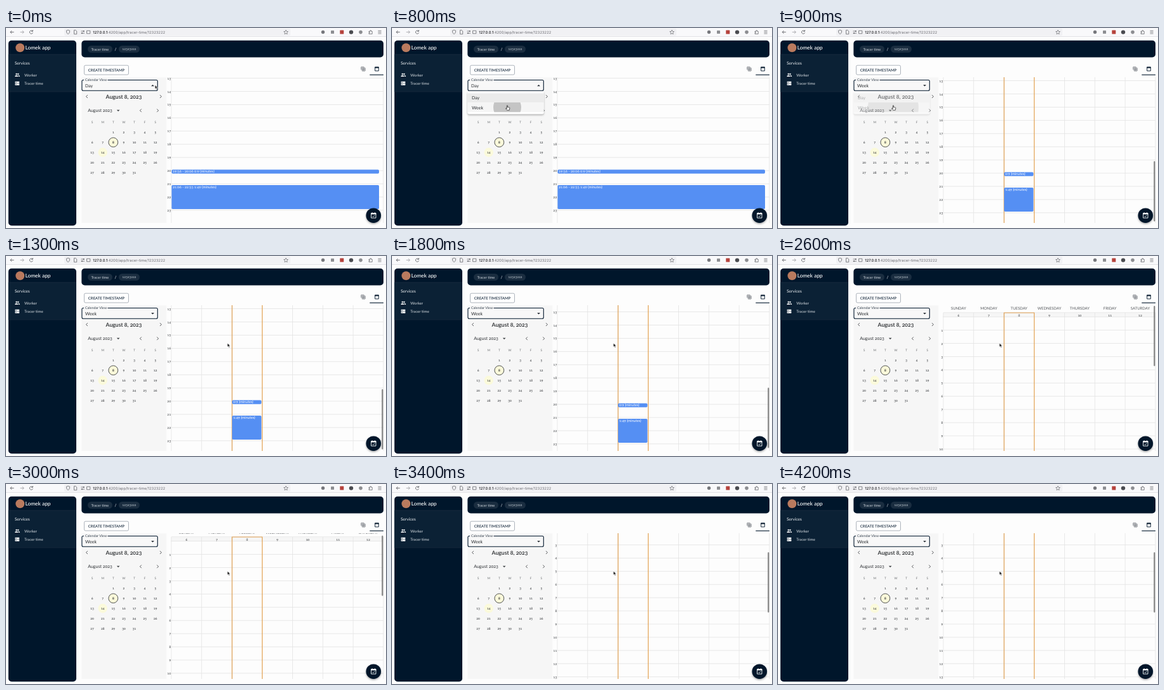
Recreate the animation shown at these times as an HTML page. Size 600x317 px, loop 4.3 s.

```html
<!DOCTYPE html>
<html lang="en">
<head>
<meta charset="utf-8">
<title>Calendar view</title>
<style>
  html, body { margin: 0; width: 100%; height: 100%; overflow: hidden; background: #fdfdfd; }
  svg { display: block; width: 100%; height: 100%; }
  text {
    font-family: Lato, "Open Sans", sans-serif;
    font-variant-numeric: oldstyle-nums;
    text-rendering: geometricPrecision;
    white-space: pre;
  }
</style>
</head>
<body>
<svg id="stage" viewBox="0 0 600 317">
  <defs>
    <clipPath id="pane"><rect x="252" y="78.5" width="345" height="230.5"/></clipPath>
    <clipPath id="weekItem"><rect x="119.5" y="118" width="120" height="15.2"/></clipPath>
    <filter id="shadow" x="-30%" y="-30%" width="160%" height="180%">
      <feDropShadow dx="0" dy="1.5" stdDeviation="1.6" flood-opacity=".35"/>
    </filter>
  </defs>
</svg>
<script>
const LOOP = 4300;
const NAVY = '#00162b', INK = '#2a2d31', BLUE = '#558ff3', ORANGE = '#e2a050', GRID = '#e3e3e3';
const DAY_SCROLL = 289.2, WEEK_SCROLL = 285.2;
const stage = document.getElementById('stage');

function add(parent, tag, attrs) {
  const el = document.createElementNS('http://www.w3.org/2000/svg', tag);
  for (const key in attrs) el.setAttribute(key, attrs[key]);
  return parent.appendChild(el);
}
const group = (parent, attrs = {}) => add(parent, 'g', attrs);
const box = (parent, x, y, width, height, fill, rx = 0, more = {}) =>
  add(parent, 'rect', { x, y, width, height, fill, rx, ...more });
const disc = (parent, cx, cy, r, fill, more = {}) => add(parent, 'circle', { cx, cy, r, fill, ...more });
const line = (parent, d, stroke, width = 1, more = {}) =>
  add(parent, 'path', { d, fill: 'none', stroke, 'stroke-width': width, ...more });
const shape = (parent, d, fill, more = {}) => add(parent, 'path', { d, fill, ...more });

// y is the vertical middle of the capitals
function label(parent, x, y, string, size, fill = INK, more = {}) {
  const el = add(parent, 'text', { x, y: y + size * .36, 'font-size': size, fill, ...more });
  el.textContent = string;
  return el;
}
const centred = (parent, x, y, string, size, fill, more = {}) =>
  label(parent, x, y, string, size, fill, { 'text-anchor': 'middle', ...more });

// steps: [time in ms, value], each value held until the next
function hold(el, property, steps) {
  const frames = steps.map(([time, value]) =>
    ({ offset: time / LOOP, [property]: value, easing: 'step-end' }));
  frames.push({ offset: 1, [property]: steps[steps.length - 1][1] });
  el.animate(frames, { duration: LOOP, iterations: Infinity });
}
const showBetween = (el, from, to) => hold(el, 'opacity', [
  [0, from ? 0 : 1], ...(from ? [[from, 1]] : []), ...(to < LOOP ? [[to, 0]] : [])]);
const move = (x, y) => `translate(${x}px, ${y}px)`;

function browserBar() {
  const g = group(stage), grey = '#66676c';
  box(g, 0, 0, 600, 13.5, '#f9f9fb');
  box(g, 92, .8, 357, 11.6, '#f1f1f4', 2);
  box(g, 0, 13.2, 600, .7, '#d9d9dd');
  line(g, 'M12.5 6.5H7M9.3 4L6.8 6.5L9.3 9', grey, .9);
  line(g, 'M22.5 6.5H28M25.7 4L28.2 6.5L25.7 9', '#a5a5aa', .9);
  line(g, 'M42 5A2.6 2.6 0 1 0 42.4 7.4M42.3 3V5.3H40', grey, .9);
  line(g, 'M95.3 4.2L98 3.2L100.7 4.2Q100.7 8.5 98 9.8Q95.3 8.5 95.3 4.2Z', grey, .8);
  line(g, 'M107.5 3.4H110L111.7 5V9.7H107.5Z', grey, .8);
  line(g, 'M118.5 5H124M118.5 8.2H124', grey, .8);
  disc(g, 122.6, 5, 1, grey);
  disc(g, 120, 8.2, 1, grey);
  line(g, 'M127.5 4.3H132.8V8.8H127.5Z', grey, .8);
  const url = label(g, 137.3, 6.6, '', 5.85, '#6d6d73',
    { style: 'font-family: Inter, sans-serif; font-variant-numeric: normal' });
  const host = add(url, 'tspan', { fill: '#17171b', 'font-weight': 500 });
  host.textContent = '127.0.0.1';
  url.append(':4200/app/tracer-time/12323222');
  line(g, 'M442 3.2L443 5.4L445.4 5.7L443.6 7.3L444.1 9.7L442 8.5L439.9 9.7L440.4 7.3L438.6 5.7L441 5.4Z', grey, .7);
  disc(g, 500.5, 6.5, 2.7, '#77787d');
  box(g, 513, 4, 5, 5, '#8d8e92', .5);
  box(g, 527.3, 3.6, 6, 6, '#b5423c', .6);
  disc(g, 545, 6.6, 3.2, '#4a4b50');
  disc(g, 560, 6.6, 2.8, '#8d8e92');
  line(g, 'M573 5.2H575V3.9H576.5V5.2H578.2V9.4H573V7.9H574.2V6.6H573Z', grey, .8);
  line(g, 'M587.4 4.3H592.6M587.4 6.6H592.6M587.4 8.9H592.6', grey, .8);
}

function sidebar() {
  const g = group(stage);
  box(g, 3.8, 19.7, 107.2, 293.5, NAVY, 5);
  box(g, 3.8, 42, 107.2, 59, '#0b2135');
  box(g, 3.8, 41.7, 107.2, .5, '#2a3b4c');
  box(g, 3.8, 100.8, 107.2, .5, '#1f3142');
  disc(g, 22.2, 31.3, 7, '#b97a5e');
  label(g, 30.4, 31, 'Lomek app', 8.4, '#fff', { 'font-weight': 500 });
  label(g, 13.8, 56.1, 'Services', 6.6, '#f0f3f5');
  label(g, 29, 74.5, 'Worker', 6.1, '#d3d9de');
  label(g, 29, 87.6, 'Tracer time', 6.1, '#d3d9de');
  disc(g, 16.5, 73, 1.2, '#fff');
  disc(g, 19.3, 73, 1.2, '#dfe4e8');
  shape(g, 'M14 77.1V76Q16.5 74 19 76V77.1ZM19.7 77.1V76L19.2 75Q21.6 75 21.8 76V77.1Z', '#fff');
  for (const y of [84.7, 88]) {
    box(g, 14.3, y, 6.8, 2.7, '#fff', .4);
    disc(g, 16, y + 1.35, .6, NAVY);
  }
}

function header() {
  const g = group(stage);
  box(g, 119.3, 19.7, 476.7, 26.8, NAVY, 5);
  box(g, 129, 28, 39, 11, '#1a2d40', 5.5);
  box(g, 178, 28, 33, 11, '#1a2d40', 5.5);
  centred(g, 148.4, 33.5, 'Tracer time', 5.7, '#cfd6dc');
  centred(g, 173, 33.4, '/', 6.5, '#fff');
  centred(g, 194.5, 33.5, '12323222', 5.1, '#cfd6dc');

  box(g, 123.5, 59.2, 70, 14.8, '#fff', 2, { stroke: '#8a94a0', 'stroke-width': .7 });
  centred(g, 158.5, 66.7, 'CREATE TIMESTAMP', 6, '#0b1f33', { 'font-weight': 500 });
  line(g, 'M560.8 66V61.8H565.5M562.3 63.3H567V68H562.3ZM562.3 65.6H567M564.6 63.3V68', '#5d636a', .8);
  line(g, 'M582.7 62.2H588.3V68H582.7Z', NAVY, .9);
  box(g, 582.3, 61.6, 6.4, 1.9, NAVY);
  box(g, 574.3, 73.7, 21.7, 1.1, NAVY);
}

function eventBlock(parent, x, width, start, end, caption) {
  const y = hourY(start), height = Math.max(6.2, hourY(end) - y);
  box(parent, x, y, width, height, BLUE, 1.8);
  label(parent, x + 1.8, y + 2.8, caption, 5.7, '#fff');
}
const hourY = hour => 96.6 + 20.93 * hour;
const columnX = index => 261 + 47.85 * index;

function hourGrid(parent) {
  for (let hour = 0; hour < 24; hour++) {
    box(parent, 260, hourY(hour) - .35, 336, .8, GRID);
    if (hour) label(parent, 260.4, hourY(hour) + .2, hour, 5.4, '#45484b', { 'text-anchor': 'end' });
  }
}

function schedule() {
  box(stage, 253.5, 78.5, 342.5, 230.5, '#fdfdfd');
  const pane = group(stage, { 'clip-path': 'url(#pane)' });

  const day = group(pane);
  const dayBody = group(day, { transform: `translate(0 ${-DAY_SCROLL})` });
  hourGrid(dayBody);
  box(dayBody, 260.6, 90, .8, 520, GRID);
  box(dayBody, 595.5, 90, .8, 520, GRID);
  eventBlock(dayBody, 261.5, 327.5, 19 + 56 / 60, 20.1, '19:56 - 20:06 0:9 (minutes)');
  eventBlock(dayBody, 261.5, 327.5, 21.1, 22 + 55 / 60, '21:06 - 22:55 1:49 (minutes)');
  showBetween(day, 0, 900);

  const week = group(pane), body = group(week);
  box(body, 261, 89.8, 335, 6.8, '#f6f6f6');
  hourGrid(body);
  box(body, 261, 89.4, 335, .8, GRID);
  ['SUNDAY', 'MONDAY', 'TUESDAY', 'WEDNESDAY', 'THURSDAY', 'FRIDAY', 'SATURDAY'].forEach((name, i) => {
    const middle = columnX(i + .5);
    centred(body, middle, 83.1, name, 6, '#55585c');
    centred(body, middle, 93.6, 6 + i, 5.4, '#3d4043');
  });
  for (let i = 0; i <= 7; i++) box(body, columnX(i) - .4, 90, .8, 520, GRID);
  line(body, `M${columnX(2) + .3} 610V90H${columnX(3)}V610`, ORANGE, 1.15);
  eventBlock(body, 357, 46.3, 19 + 56 / 60, 20.1, '0:9 (minutes)');
  eventBlock(body, 357, 46.3, 21.1, 22 + 55 / 60, '1:49 (minutes)');
  const thumb = box(week, 593.3, 79, 2.1, 95.5, '#7f7f7f', 1);
  showBetween(week, 900, LOOP);

  const scroll = [
    [0, WEEK_SCROLL], [1700, 284], [1800, 280.2], [1900, 262], [2000, 225], [2100, 170],
    [2200, 115], [2300, 68], [2400, 32], [2500, 10], [2600, 0],
    [3000, 6], [3100, 22], [3200, 43], [3300, 58], [3400, 63]];
  hold(body, 'transform', scroll.map(([time, top]) => [time, move(0, -top)]));
  hold(thumb, 'transform', scroll.map(([time, top]) => [time, move(0, top * .463)]));
}

function datePicker() {
  const g = group(stage);
  box(g, 119.5, 78.5, 134, 230.5, '#f6f6f6');
  const chevron = (x, y, side) =>
    line(g, `M${x - side * 1.2} ${y - 2.4}L${x + side * 1.2} ${y}L${x - side * 1.2} ${y + 2.4}`, '#44474a', .9);
  chevron(127.7, 108.6, -1);
  chevron(244.3, 108.6, 1);
  chevron(212.7, 130.8, -1);
  chevron(239.5, 130.8, 1);
  centred(g, 186, 108.7, 'August 8, 2023', 8.7, '#111417', { 'font-weight': 500 });
  label(g, 129.3, 130.9, 'August 2023', 7, INK);
  shape(g, 'M174.8 129.7H179.6L177.2 132.2Z', '#44474a');

  const cellX = column => 136.1 + 16.63 * column;
  [...'SMTWTFS'].forEach((name, i) => centred(g, cellX(i), 148.9, name, 4.9, '#6d7073'));
  disc(g, cellX(2), 181.2, 7.4, '#fbf9da', { stroke: '#25282b', 'stroke-width': .8 });
  disc(g, cellX(1), 197.1, 7.3, '#fbfadb');
  for (let date = 1; date <= 31; date++) {
    const slot = date + 1;
    centred(g, cellX(slot % 7), 165.4 + 15.85 * Math.floor(slot / 7), date, 5.2, INK,
      { 'font-weight': date === 8 ? 700 : 400 });
  }
}

function viewSelect() {
  const g = group(stage);
  box(g, 119.9, 82.5, 119.4, 16.7, '#f8f8f8', 2, { stroke: NAVY, 'stroke-width': 1.1 });
  box(g, 123, 80.5, 37.5, 4, '#f7f7f7');
  label(g, 125, 82.5, 'Calendar View', 5.4, '#34414e');
  const dayName = label(g, 125, 91.3, 'Day', 6.9, INK);
  const weekName = label(g, 125, 91.3, 'Week', 7.1, INK);
  const up = shape(g, 'M229.2 92.2H234L231.6 89.8Z', '#2b3138');
  const down = shape(g, 'M229.2 90H234L231.6 92.4Z', '#2b3138');
  for (const el of [dayName, up]) showBetween(el, 0, 900);
  for (const el of [weekName, down]) showBetween(el, 900, LOOP);
}

function viewMenu() {
  const g = group(stage);
  box(g, 119.5, 100.5, 120, 35.7, '#fff', 2, { filter: 'url(#shadow)' });
  box(g, 119.5, 103.5, 120, 14.7, '#ebebeb');
  const hover = box(g, 119.5, 118.2, 120, 15, '#f5f5f5');
  const ripples = group(g, { 'clip-path': 'url(#weekItem)' });
  const ripple = disc(ripples, 182, 125.8, 22, '#c4c4c4');
  label(g, 126, 111, 'Day', 6.9, INK);
  label(g, 126, 126, 'Week', 7.1, INK);
  showBetween(hover, 500, LOOP);
  hold(ripple, 'r', [[0, '0px'], [700, '8px'], [800, '22px'], [900, '40px']]);
  hold(g, 'opacity', [[0, 0], [100, .5], [200, 1], [900, .35], [1000, 0]]);
}

function actionButton() {
  const g = group(stage);
  disc(g, 580.3, 297.2, 11.8, NAVY, { filter: 'url(#shadow)' });
  line(g, 'M576.6 293.9H584V301.1H576.6Z', '#fff', .9);
  box(g, 576.2, 293.2, 8.2, 2.2, '#fff');
  line(g, 'M578.2 292.2V294M582.4 292.2V294', '#fff', .9);
  line(g, 'M578.5 298.1L579.8 299.4L582.3 296.8', '#fff', .8);
}

function pointer() {
  const g = group(stage);
  const outline = { stroke: '#fff', 'stroke-width': .7, 'stroke-linejoin': 'round' };
  const arrow = shape(g, 'M0 0V6.2L1.4 5L2.4 7.3L3.6 6.8L2.6 4.6H4.4Z', '#000', outline);
  const hand = shape(g,
    'M-.6 .2Q0 -.5 .6 .2V2.6L3.4 3.2Q4 3.5 3.8 4.5L3.2 7.4H-.4L-2.6 4.6Q-2.2 3.7 -.6 5Z',
    '#fff', { stroke: '#111', 'stroke-width': .7, 'stroke-linejoin': 'round' });
  hold(g, 'transform', [
    [0, move(235.3, 90.3)], [200, move(233, 94)], [300, move(217, 104)], [400, move(197, 115)],
    [500, move(185, 121.5)], [600, move(182, 122.8)], [1000, move(214, 127)],
    [1100, move(305, 135)], [1200, move(349.6, 138)]]);
  hold(hand, 'opacity', [[0, 0], [300, 1], [1000, 0]]);
  hold(arrow, 'opacity', [[0, 1], [300, 0], [1000, 1]]);
}

browserBar();
sidebar();
header();
datePicker();
schedule();
viewSelect();
viewMenu();
actionButton();
pointer();
</script>
</body>
</html>
```
